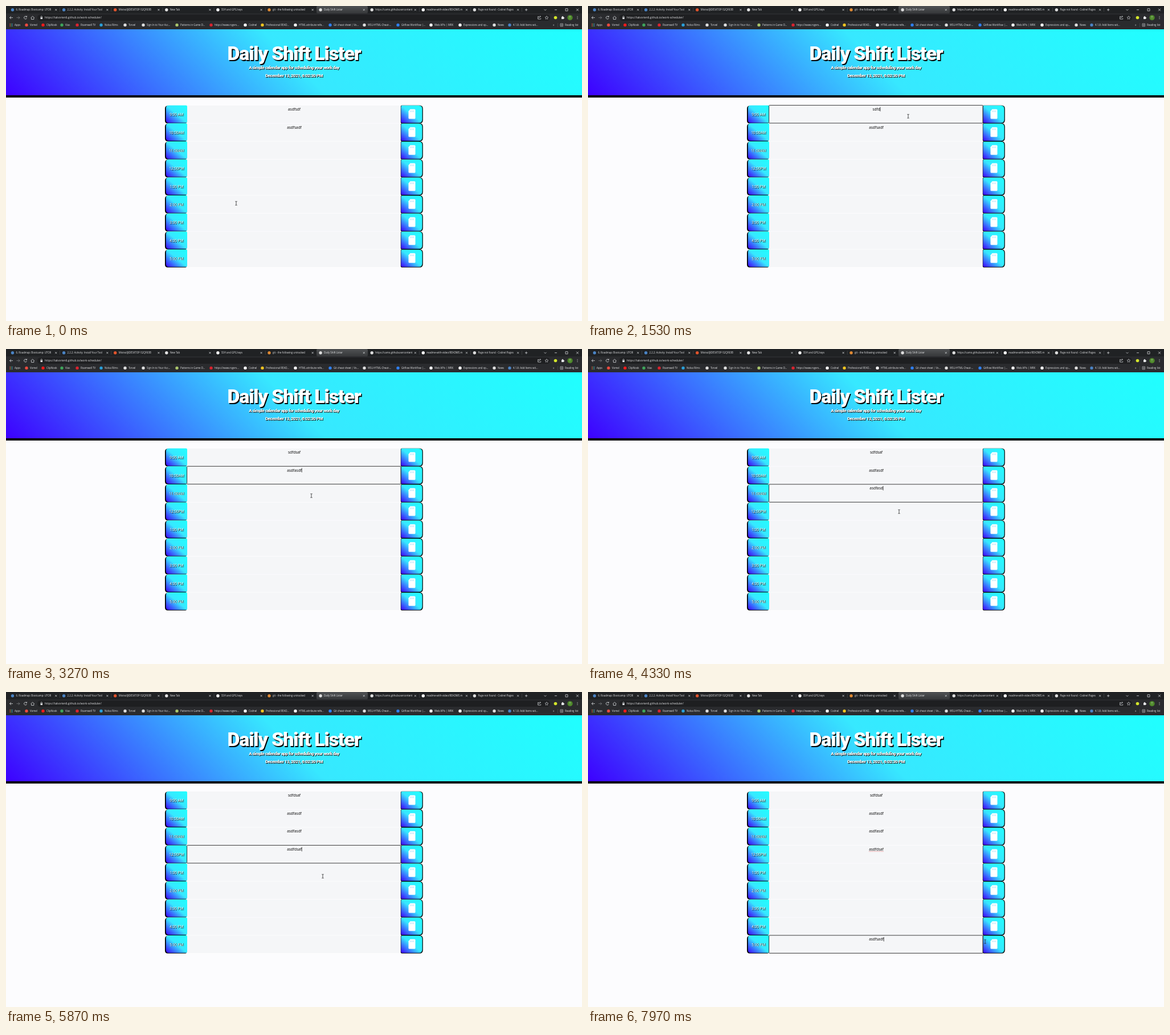
These frames come from a looping animation (1011x554 px, 8 s). An HTML page:

```html
<!DOCTYPE html>
<html lang="en">
<head>
<meta charset="utf-8">
<title>Daily Shift Lister</title>
<style>
html, body { margin: 0; height: 100%; overflow: hidden; background: #fcfcfe; }
svg { display: block; width: 100vw; height: 100vh; }
text { white-space: pre; }
.ui { font: 4.4px "Open Sans", "Noto Sans", sans-serif; fill: #e2e3e5; }
.url { font-size: 4.9px; }
.task { font: 500 6.4px "Noto Sans", "Open Sans", sans-serif; text-anchor: middle; fill: #111; }
.hour { font: 6.4px "Noto Sans", "Open Sans", sans-serif; text-anchor: middle; }
.head { font: 900 7.8px Roboto, sans-serif; text-anchor: middle; letter-spacing: -.47px; }
.title { font-size: 34px; letter-spacing: -1.2px; }
.line { fill: none; stroke: #d5d7da; stroke-width: .8; }
</style>
</head>
<body>
<svg id="stage" viewBox="0 0 1011 554" preserveAspectRatio="none"></svg>
<script>
const stage = document.getElementById('stage');
const ROW_Y = 175, PITCH = 31.67, ROW_H = 30.8, MID = 506, LOOP = 8000;
const rowY = i => ROW_Y + i * PITCH;

const rect = (x, y, w, h, fill, extra = '') =>
  `<rect x="${x}" y="${y}" width="${w}" height="${h}" fill="${fill}" ${extra}/>`;
const dot = (x, y, r, fill) => `<circle cx="${x}" cy="${y}" r="${r}" fill="${fill}"/>`;
const line = (d, extra = '') => `<path class="line" d="${d}" ${extra}/>`;
const text = (s, x, y, cls, extra = '') => `<text x="${x}" y="${y}" class="${cls}" ${extra}>${s}</text>`;
const shadowed = (s, x, y, cls, d) =>
  text(s, x + d, y + d, cls, 'fill="#000"') + text(s, x, y, cls, 'fill="#fff"');

const stops = `<stop offset="0" stop-color="#3d00ff"/><stop offset=".5" stop-color="#37e8ff"/>
  <stop offset="1" stop-color="#20ffff"/>`;
const defs = `<defs>
  <linearGradient id="sky" gradientUnits="userSpaceOnUse" x1="223.5" y1="381" x2="787.5" y2="-183">${stops}</linearGradient>
  <linearGradient id="cell" x1="0" y1="1" x2="1" y2="0">${stops}</linearGradient>
  <linearGradient id="tab" x1="0" y1="0" x2="0" y2="1"><stop stop-color="#505254"/><stop offset="1" stop-color="#36383a"/></linearGradient>
</defs>`;

function browserTabs() {
  const tabs = [
    ['6. Roadmap: Bootcamp: UTOR', '#4a83c4'], ['2.2.2: Activity: Install Your Tool', '#4a83c4'],
    ['Mistral@DESKTOP-52QF83B', '#e2542c'], ['New Tab', '#e4e4e4'], ['SSH and GPG keys', '#fff'],
    ['git - the following untracked', '#e08a33'], ['Daily Shift Lister', '#ddd'],
    ['https://camo.githubusercontent', '#ddd'], ['readme-with-video/README.m', '#fff'],
    ['Page not found · Codnel Pages', '#ddd']];
  let s = rect(0, 0, 1011, 13, '#202224') + rect(545, 0, 90, 13, 'url(#tab)', 'rx="2"');
  tabs.forEach(([name, color], i) => {
    const x = 11.5 + i * 90.1;
    s += dot(x, 6.7, 2.7, color) + text(name, x + 6, 8.3, 'ui') +
      line(`M${x + 74.7} 5.2l3 3m0 -3l-3 3`);
    if (i < 5 || i > 6) s += rect(x + 83, 3, .5, 7, '#55575a');
  });
  return s + line('M911 6.7h4.4m-2.2 -2.2v4.4M944.5 5.8l2 2 2 -2M963 6.7h4M982 4.7h4v4h-4zM1001 4.7l4 4m0 -4l-4 4');
}

function toolbar() {
  return rect(0, 13, 1011, 28, '#2a2b2e') + rect(55, 15, 900, 11, '#1e1f21', 'rx="5.5"') +
    line('M12 20.5h-5.5m2.5 -2.5l-2.5 2.5 2.5 2.5') +
    line('M18.5 20.5h5.5m-2.5 -2.5l2.5 2.5 -2.5 2.5', 'opacity=".45"') +
    line('M36 18.8a2.5 2.5 0 1 0 .5 2.5M36.5 17.2v2h-2M43.5 20.8l3.2 -2.8 3.2 2.8M44.6 20.5v3h4.2v-3') +
    rect(60.5, 20, 3.6, 3, '#d5d7da') + line('M61.2 20v-1.2a1.1 1.1 0 0 1 2.2 0v1.2') +
    text('https://talvorien6.github.io/work-scheduler/', 68, 22.4, 'ui url') +
    line('M935.5 18.5h-1.8v4.5h5v-1.5M935.5 21c.2 -2 1.5 -2.5 3 -2.5m-1.3 -1.2l1.3 1.2 -1.3 1.2') +
    line('M949 17.5l.9 2 2.1 .2 -1.6 1.4 .5 2.1 -1.9 -1.1 -1.9 1.1 .5 -2.1 -1.6 -1.4 2.1 -.2z', 'style="stroke-width:.6"') +
    dot(964.5, 20.5, 2.8, '#d3e52b') + rect(975, 19, 4, 4, '#e2e3e5') + dot(977, 18.7, 1, '#e2e3e5') + dot(979.2, 21, 1, '#e2e3e5') +
    dot(990, 20.5, 4.6, '#4f8a2b') + text('T', 990, 22.2, 'ui', 'text-anchor="middle"') +
    [18.5, 20.5, 22.5].map(y => dot(1003, y, .6, '#e2e3e5')).join('');
}

function bookmarks() {
  const marks = [
    [42, 'Vomel', '#e94a3f'], [71, 'ClipNook', '#f01c1c'], [104, 'Vias', '#3fa45b'],
    [131, 'Roamwell TV', '#d8232f'], [173, 'Nolva Films', '#2a9fd8'], [215, 'Torvel', '#ddd'],
    [247, 'Sign In to Your Acc...', '#ddd'], [306, 'Patterns in Game D...', '#a9c56b'],
    [366, 'https://www.rogers...', '#d8232f'], [426, 'Codnel', '#fff'],
    [456, 'Professional READ...', '#f2c320'], [514, 'HTML attribute refe...', '#fff'],
    [575, 'Git cheat sheet | Vo...', '#2f7ff0'], [635, 'WSU-HTML-Cheat-...', '#ddd'],
    [694, 'Gitflow Workflow |...', '#2f7ff0'], [752, 'Web APIs | WRK', '#fff'],
    [803, 'Expressions and op...', '#fff'], [863, 'News', '#ddd'], [890, '4.1.8: Add Items wit...', '#4a83c4']];
  let s = text('Apps', 15, 35, 'ui');
  for (let i = 0; i < 9; i++)
    s += rect(6.5 + i % 3 * 2, 30.8 + Math.floor(i / 3) * 2, 1.3, 1.3, ['#e94a3f', '#3fa45b', '#4a83c4'][i % 3]);
  for (const [x, name, color] of marks) s += dot(x - 6, 33.4, 2.7, color) + text(name, x, 35, 'ui');
  return s + text('»', 960, 35, 'ui url') + rect(968.5, 30, .5, 7, '#55575a') +
    line('M973 31h4.5v4.8h-4.5zM974 32.8h2.5M974 34.2h2.5', 'style="stroke-width:.6"') + text('Reading list', 981, 35, 'ui');
}

function header() {
  return rect(0, 41, 1011, 117, 'url(#sky)') + rect(0, 157, 1011, 4, '#000') +
    shadowed('Daily Shift Lister', 505.5, 95, 'head title', 1.6) +
    shadowed('A simple calendar app for scheduling your work day', 505.5, 110.7, 'head', .8) +
    shadowed('December 13, 2021, 6:02:30 PM', 505.5, 125, 'head', .8);
}

// Side cell with a wide radius on its outer side and a narrow one inside
function cellPath(x, y, w, h, left) {
  const a = left ? 5 : 2, b = left ? 2 : 6;
  return `M${x + a} ${y}h${w - a - b}q${b} 0 ${b} ${b}v${h - 2 * b}q0 ${b} ${-b} ${b}` +
    `h${a + b - w}q${-a} 0 ${-a} ${-a}v${2 * a - h}q0 ${-a} ${a} ${-a}z`;
}

function schedule() {
  const hours = ['9:00 AM', '10:00AM', '11:00AM', '12:00PM', '1:00 PM', '2:00 PM', '3:00 PM', '4:00 PM', '5:00 PM'];
  return hours.map((hour, i) => {
    const y = rowY(i), cy = y + 6.5;
    return rect(318, y, 375, ROW_H, '#f5f6f8') +
      `<path d="${cellPath(279, y + .6, 38, ROW_H, true)}"/>
       <path d="${cellPath(280.8, y - .3, 37.2, ROW_H - .1, true)}" fill="url(#cell)"/>
       <path d="${cellPath(692.8, y - .3, 39, ROW_H + .9, false)}"/>
       <path d="${cellPath(693.4, y + .1, 37.2, ROW_H - .5, false)}" fill="url(#cell)"/>
       <path d="M709.5 ${cy}h7.5q1.5 0 1.5 1.5v14q0 1.5 -1.5 1.5h-9q-1.5 0 -1.5 -1.5v-12z" fill="#fff"/>` +
      [709.4, 712, 714.6].map(x => rect(x, cy + 2, 1.2, 3, '#b5e2f6')).join('') +
      shadowed(hour, 299.3, y + 18.2, 'hour', .7);
  }).join('');
}

// row, click time, typing start, typing end, text before, text after
const entries = [
  [0, 720, 1100, 1850, 'asdfsdf', 'sdfdsaf'],
  [1, 2280, 2450, 3150, 'asdfsadf', 'asdfasdf'],
  [2, 3480, 3700, 4400, '', 'asdfasdf'],
  [3, 4600, 4800, 5600, '', 'asdfdsaf'],
  [8, 6500, 6700, 7400, '', 'asdfsadf']];

// time, x, y of the pointer
const path = [
  [0, 404, 347], [600, 520, 190], [720, 515, 184], [970, 562, 193], [1700, 562, 194], [2130, 550, 222],
  [2300, 548, 222], [2900, 546, 224], [3270, 536, 258], [3480, 534, 260], [4000, 536, 262], [4330, 546, 286],
  [4600, 548, 288], [5400, 550, 290], [5870, 556, 324], [6450, 540, 438], [7500, 506, 438],
  [7740, 724, 229], [7970, 697, 439], [LOOP, 697, 439]];

stage.innerHTML = defs + rect(0, 0, 1011, 554, '#fcfcfe') + browserTabs() + toolbar() + bookmarks() + header() + schedule() +
  rect(317.6, 0, 375.6, 31.4, 'none', 'id="focus" rx="1" stroke="#222" stroke-width=".9"') +
  rect(0, 0, 0, 7.6, '#3b8eea', 'id="select"') +
  entries.map(e => text('', MID, rowY(e[0]) + 9, 'task')).join('') +
  rect(0, 0, .7, 7.6, '#000', 'id="caret"') +
  `<path id="typo" d="M493 ${rowY(3) + 10.4}h26" stroke="#e06a6a" stroke-width=".7" stroke-dasharray="1 .5"/>
   <path id="pointer" d="M-1.7 -3.3h1.2l.5 .4 .5 -.4h1.2M0 -3v6M-1.7 3.3h1.2l.5 -.4 .5 .4h1.2" fill="none" stroke="#222" stroke-width=".8"/>`;

const [focusBox, selection, caret, typo, pointer] =
  ['focus', 'select', 'caret', 'typo', 'pointer'].map(id => document.getElementById(id));
const tasks = [...stage.querySelectorAll('.task')];
const set = (el, attrs) => { for (const k in attrs) el.setAttribute(k, attrs[k]); };
const show = (el, on) => set(el, { visibility: on ? 'visible' : 'hidden' });

function draw(t) {
  const active = entries.filter(e => t >= e[1]).length - 1;
  for (const el of [focusBox, selection, caret]) show(el, false);
  entries.forEach(([row, click, start, end, before, after], i) => {
    const el = tasks[i], typed = Math.floor(Math.min(1, (t - start) / (end - start)) * after.length);
    const value = t < start ? before : after.slice(0, typed);
    const picked = i === active && t < start && before !== '';
    if (el.textContent !== value) el.textContent = value;
    el.style.fill = picked ? '#fff' : '';
    if (i !== active) return;
    const y = rowY(row), w = value ? el.getComputedTextLength() : 0;
    set(focusBox, { y: y - .4 });
    set(selection, { x: MID - w / 2, y: y + 2.7, width: w });
    set(caret, { x: MID + w / 2, y: y + 2.7 });
    show(focusBox, true);
    show(picked ? selection : caret, true);
  });
  show(typo, t >= entries[4][1]);

  const k = path.findIndex(p => p[0] > t), [t0, x0, y0] = path[k - 1], [t1, x1, y1] = path[k];
  const u = (t - t0) / (t1 - t0), ease = u * u * (3 - 2 * u);
  set(pointer, { transform: `translate(${x0 + (x1 - x0) * ease} ${y0 + (y1 - y0) * ease})` });
}

function tick() {
  draw(performance.now() % LOOP);
  requestAnimationFrame(tick);
}
tick();
</script>
</body>
</html>
```
